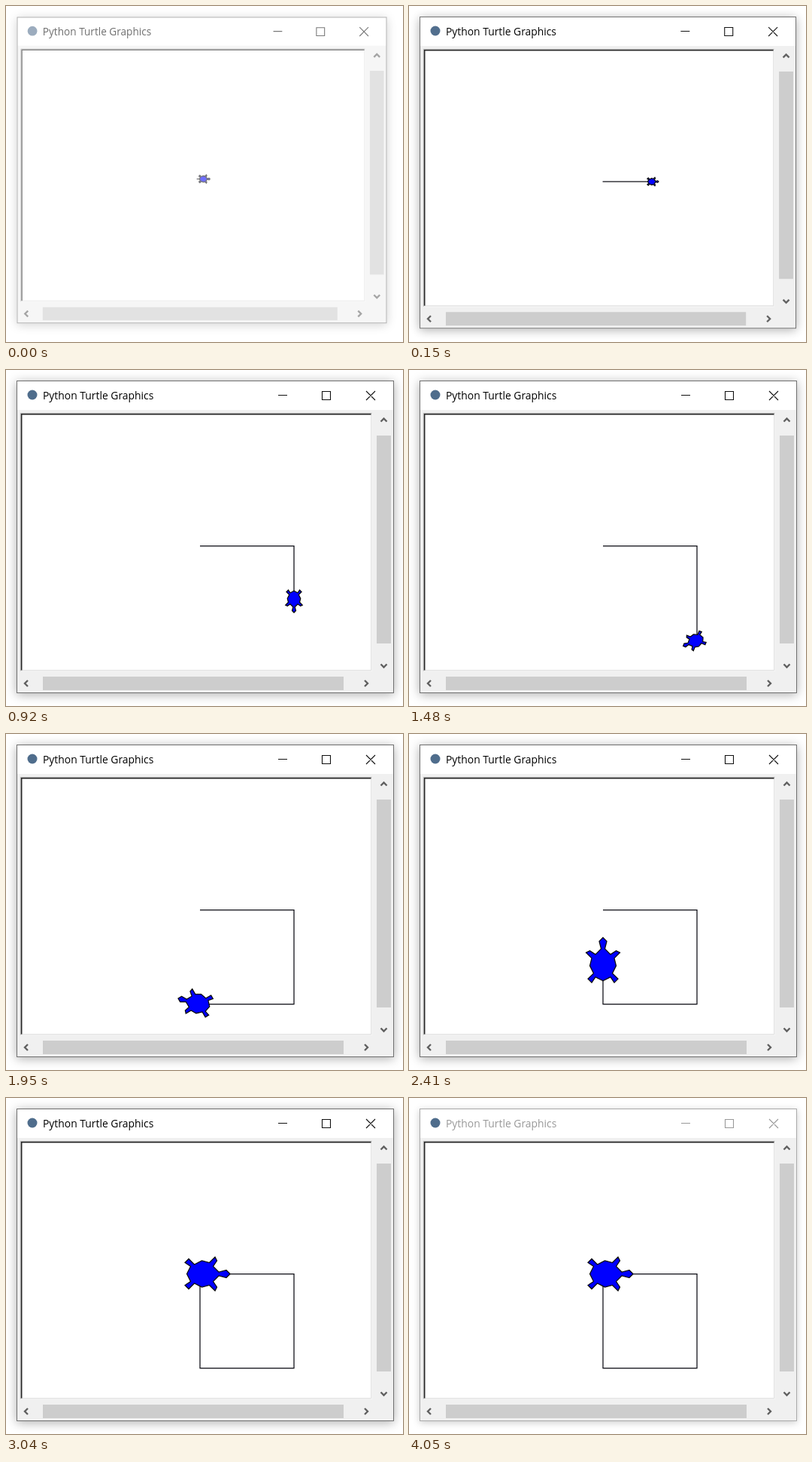
Animation of 528 by 446 pixels, one loop 4280 ms. Source, as an HTML page:

```html
<!DOCTYPE html>
<html lang="en">
<head>
<meta charset="utf-8">
<title>Turtle square</title>
<style>
  html, body { margin: 0; width: 100%; height: 100%; overflow: hidden; background: #fff; }
  svg { display: block; }
  text { font: 13.9px "Open Sans", "Noto Sans", sans-serif; }
  #shade { filter: drop-shadow(0 2px 7px rgba(0, 0, 0, .32)); }
  .inactive #shade { filter: drop-shadow(0 2px 5px rgba(0, 0, 0, .2)); }
  #edge { fill: none; stroke: #707070; }
  .inactive #edge { stroke: #aaa; }
  #title { fill: #000; }
  #buttons { fill: none; stroke: #111; stroke-width: 1.1; }
  .inactive #title { fill: #999; }
  .inactive #buttons { stroke: #999; }
  #chevrons { fill: none; stroke: #606060; stroke-width: 2.4; }
</style>
</head>
<body>
<svg width="528" height="446" viewBox="0 0 528 446">
  <g id="window">
    <rect id="shade" x="14" y="14" width="502" height="415" fill="#fff"/>
    <rect x="15" y="53" width="500" height="375" fill="#f0f0f0"/>
    <circle cx="35" cy="33" r="6.5" fill="#4f6d8c"/>
    <text id="title" x="49" y="39">Python Turtle Graphics</text>
    <g id="buttons">
      <path d="M362 33.5h12M420.5 28.5h11v11h-11zM479 28l12 12M491 28l-12 12"/>
    </g>
    <rect x="19" y="57" width="468" height="343" fill="#fff"/>
    <rect x="20" y="58" width="466.500" height="341.500" fill="#e3e3e3"/>
    <rect x="21" y="59" width="464" height="339" fill="#fff"/>
    <path d="M19.400 399.500V57.400H486.500" fill="none" stroke="#a0a0a0" stroke-width=".9"/>
    <path d="M20.700 398.500V58.700H485.500" fill="none" stroke="#262626" stroke-width="1.500"/>
    <path d="M493 87h19v276h-19zM49 407h400v18h-400z" fill="#cdcdcd"/>
    <path id="chevrons" d="M498.500 68.500l4-4 4 4M498.500 390.500l4 4 4-4M29 412l-4 4 4 4M477 412l4 4-4 4"/>
    <path id="trail" fill="none" stroke="#0c0c14" stroke-width="1.250"/>
    <polygon id="turtle" fill="#00f" stroke="#0a0a0a"/>
    <rect id="edge" x="14.500" y="14.500" width="501" height="414"/>
  </g>
</svg>
<script>
const $ = id => document.getElementById(id);
const LOOP = 4280, BLUR_AT = 4050;
const SIDE = 125, HOPS = 31, HOME = [258, 233.5];
const LAST_HOP = 8 * HOPS;

// [step, ms] anchors; the steps between them are evenly spaced
const ANCHORS = [[0, 0], [1, 90], [2, 150], [3, 230], [7, 540], [8, 630], [12, 920],
  [13, 1010], [15, 1150], [16, 1240], [22, 1740], [23, 1800], [25, 1950], [26, 2030],
  [29, 2260], [30, 2350], [31, 2410], [32, 2500], [37, 2870], [38, 2960], [39, 3040]];

const stepTimes = [0];
ANCHORS.slice(1).forEach(([k1, t1], i) => {
  const [k0, t0] = ANCHORS[i];
  for (let k = k0 + 1; k <= k1; k++) {
    stepTimes[k] = Math.round((t0 + (t1 - t0) * (k - k0) / (k1 - k0)) / 10) * 10;
  }
});

// Half outline as [forward, sideways], mirrored for the other half
const half = [[16, 0], [14, 2], [10, 1], [7, 4], [9, 7], [8, 9], [5, 6], [1, 7],
  [-3, 5], [-6, 8], [-8, 6], [-5, 4], [-7, 0]];
const mirrored = half.slice(1, -1).reverse().map(([x, y]) => [x, -y]);
$('turtle').setAttribute('points', half.concat(mirrored).join(' '));

const OPENING = [{ opacity: .56, scale: .98 }, { opacity: .88, scale: .993 }, { opacity: .98, scale: .998 }];
const OPEN = { opacity: 1, scale: 1 };

function ahead([x, y], side, distance) {
  const angle = side * Math.PI / 2;
  return [x + Math.cos(angle) * distance, y + Math.sin(angle) * distance];
}

function drawTurtle(hop) {
  // Each side is HOPS moves forward, then HOPS small right turns
  const side = Math.min(3, Math.floor(hop / (2 * HOPS)));
  const local = hop - side * 2 * HOPS;
  const moved = Math.min(local, HOPS) / HOPS;
  const turned = Math.max(0, local - HOPS) / HOPS;

  const points = [HOME];
  for (let i = 0; i <= side; i++) {
    points.push(ahead(points[i], i, SIDE * (i < side ? 1 : moved)));
  }
  const [x, y] = points[points.length - 1];
  const size = .625 * (side + 1);
  $('trail').setAttribute('d', 'M' + points.join('L'));
  $('turtle').setAttribute('transform',
    `translate(${x} ${y}) rotate(${90 * (side + turned)}) scale(${size})`);
  $('turtle').setAttribute('stroke-width', 1.25 / size);
}

function render(t) {
  const step = stepTimes.filter(ms => ms <= t).length - 1;
  const hop = step ? Math.min(LAST_HOP, Math.round(3.2 + 6.28 * step)) : 2;
  drawTurtle(hop);

  const { opacity, scale } = OPENING[step] || OPEN;
  const win = $('window');
  win.setAttribute('opacity', opacity);
  win.setAttribute('transform', `translate(40 40) scale(${scale}) translate(-40 -40)`);
  win.setAttribute('class', t >= BLUR_AT ? 'inactive' : '');
}

const start = performance.now();
function tick() {
  render((performance.now() - start) % LOOP);
  requestAnimationFrame(tick);
}
tick();
</script>
</body>
</html>
```
